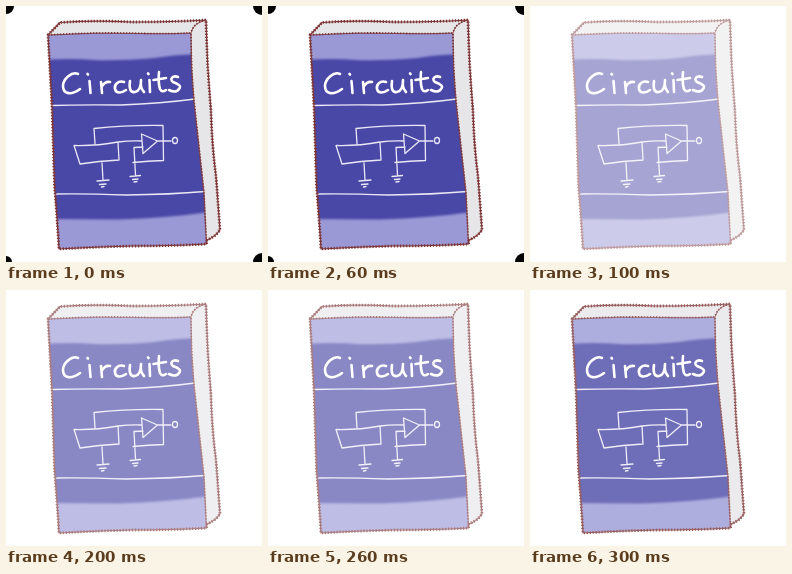
Write an HTML page with a canvas that moves like this. It is 256x256 px and loops after 400 ms.

```html
<!DOCTYPE html>
<html lang="en">
<head>
<meta charset="utf-8">
<title>Circuits book</title>
<style>
html, body { margin: 0; width: 100%; height: 100%; overflow: hidden; background: #fff; }
canvas { display: block; width: 100vw; height: 100vh; }
</style>
</head>
<body>
<canvas id="stage" width="256" height="256"></canvas>
<script>
const ctx = document.getElementById('stage').getContext('2d');
const STEP = 100;
const OPACITY = [1, 0.5, 0.65, 0.8];
const INK = '#7d3536';
const CHALK = '#e9e8f6';

const path = d => new Path2D(d);
const cover = path('M42 29 Q90 26 138 27.5 Q165 28 185 27 Q185 62 188 95 L198 187 L200.5 238 Q165 240 125 240 Q88 241 53 243 Q51 210 48.5 180 L46 100 Z');
const pages = path('M42 29 L54 16.5 Q90 14 125 16 Q165 16 200 14 Q201 60 205 105 Q206 140 210 170 L214 224 Q209 231 201 234 L198 187 L188 95 L185 27 Z');
const outline = path('M42 29 L54 16.5 Q90 14 125 16 Q165 16 200 14 Q201 60 205 105 Q206 140 210 170 L214 224 Q209 231 201 234 L200.5 238 Q165 240 125 240 Q88 241 53 243 Q51 210 48.5 180 L46 100 Z');
const seam = path('M42 29 Q90 26 138 27.5 Q165 28 185 27 Q185 62 188 95 L198 187 L200.5 238 M200 14 Q187 17 185 27');
const upperBand = path('M36 20 H192 V48 Q165 49 149 52 Q115 55 88 54 Q65 52 36 54 Z');
const lowerBand = path('M42 213 Q75 213 112 213.5 Q165 212 208 205.5 V250 H42 Z');
const rules = path('M46 99.5 Q75 98.5 115 99 Q155 97.5 189 93 M49 188 Q80 187.5 120 189 Q165 188.5 199 185.5');

const lettering = path(
  'M72 68 C66 65 57 73 57 80 C57 89 66 89 74 83' +
  'M83.5 75 L84.5 87 M81.5 68 L82 68.5' +
  'M95 76 L96 87 M95.5 81 Q99 75 104 76' +
  'M118 76 C112 74 108 79 109 83 C110 88 116 87 120 84' +
  'M124 75 C123 82 124 87 129 86 C134 85 135 80 135 74 Q134 82 138 86' +
  'M143.5 74 L144 86 M142 67.5 L142.5 68' +
  'M153 66 Q152 77 154 83 Q156 87 160 84 M147.5 74 L160 72' +
  'M172 71 C167 69 163 73 167 76 C172 78 176 80 173 83 C171 86 167 86 163 84'
);

const circuit = path(
  'M68 139.5 Q91 140 112 136 L113 154 Q93 155 74 158 Z' +
  'M89 137.5 L88 122.5 Q120 119 157 119.5 L157.5 154.5 Q142 155 127 156.5' +
  'M112 136 Q124 134.5 136 135 M135.5 128 L151.5 135 L137 147.5 Z M152 135 L165 135' +
  'M137 141 L128 141.5 L129.5 169' +
  'M96 157 L97 174 M91 175 L103 174 M93.5 178.5 L100 178 M95.5 181 L98 180.5' +
  'M124 170.5 L134.5 169.5 M126.5 173.5 L132 173 M128 176 L131 175.5'
);

function fill(shape, color) {
  ctx.fillStyle = color;
  ctx.fill(shape);
}

function stroke(shape, color, width, dash = []) {
  ctx.strokeStyle = color;
  ctx.lineWidth = width;
  ctx.setLineDash(dash);
  ctx.stroke(shape);
}

// A thin core with short, flat dashes gives the ragged ink line.
function inkEdge(shape, core, ragged) {
  ctx.lineCap = 'butt';
  stroke(shape, INK, core);
  stroke(shape, INK, ragged, [1.3, 1.7]);
  ctx.lineCap = 'round';
}

function drawBook() {
  fill(pages, '#e6e5e7');
  fill(cover, '#4a48a6');
  ctx.save();
  ctx.clip(cover);
  ctx.filter = 'blur(0.8px)';
  fill(upperBand, '#9a99d6');
  fill(lowerBand, '#9a99d6');
  ctx.filter = 'none';
  stroke(rules, CHALK, 1.4);
  ctx.restore();
  inkEdge(seam, 0.8, 1.8);
  inkEdge(outline, 1.2, 2.8);
  stroke(lettering, '#fff', 2.6);
  stroke(circuit, CHALK, 1.3);
  const node = new Path2D();
  node.ellipse(169, 134.5, 2.5, 3, 0, 0, Math.PI * 2);
  stroke(node, CHALK, 1.3);
}

function drawCorner(x, y, radius) {
  ctx.fillStyle = '#000';
  ctx.beginPath();
  ctx.arc(x, y, radius, 0, Math.PI * 2);
  ctx.fill();
}

function draw(time) {
  const step = Math.floor(time / STEP) % OPACITY.length;
  ctx.globalAlpha = 1;
  ctx.fillStyle = '#fff';
  ctx.fillRect(0, 0, 256, 256);
  ctx.lineCap = ctx.lineJoin = 'round';
  drawBook();
  // A white veil fades the whole book evenly, overlaps included.
  ctx.globalAlpha = 1 - OPACITY[step];
  ctx.fillStyle = '#fff';
  ctx.fillRect(0, 0, 256, 256);
  if (step === 0) {
    ctx.globalAlpha = 1;
    drawCorner(0, 0, 8);
    drawCorner(256, 0, 9);
    drawCorner(0, 256, 6);
    drawCorner(256, 256, 9);
  }
}

let start;
function tick(now) {
  start ??= now;
  draw(Math.max(0, now - start));
  requestAnimationFrame(tick);
}
draw(0);
requestAnimationFrame(tick);
</script>
</body>
</html>
```
